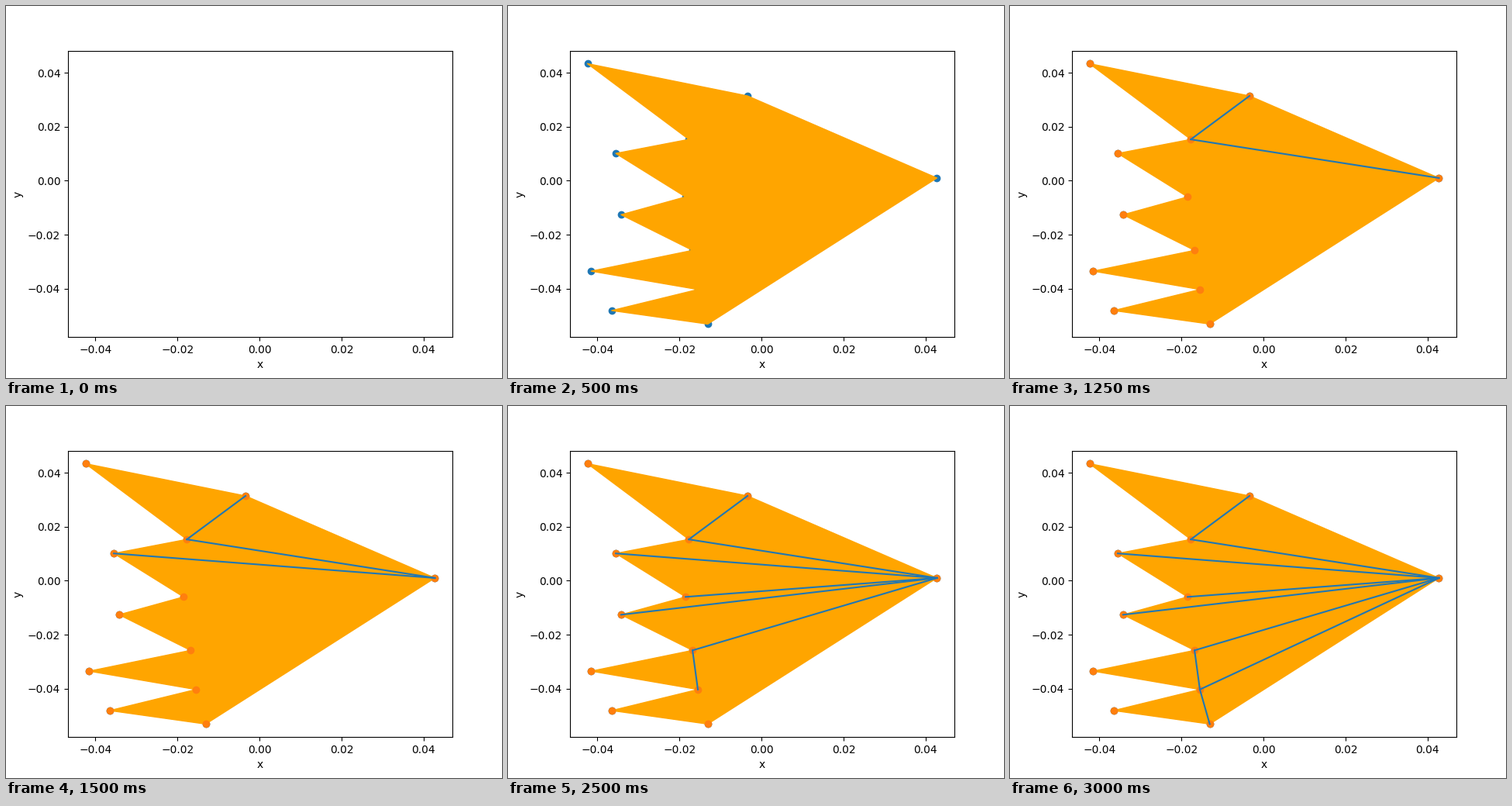
These frames come from a looping animation (640x480 px, 3.25 s). A matplotlib script:

```python
import matplotlib.pyplot as plt
from matplotlib.animation import FuncAnimation

INTERVAL = 250

# the two chains of a y-monotone polygon, each from top to bottom
LEFT = [(-0.0424, 0.04335), (-0.0177, 0.0153), (-0.0355, 0.0101),
        (-0.0185, -0.0060), (-0.0342, -0.0126), (-0.0168, -0.0258),
        (-0.0415, -0.0335), (-0.0155, -0.0403), (-0.0365, -0.0481),
        (-0.0131, -0.0531)]
RIGHT = [(-0.0034, 0.0314), (0.04275, 0.0010)]


def cross(o, a, b):
    return (a[0] - o[0]) * (b[1] - o[1]) - (a[1] - o[1]) * (b[0] - o[0])


def triangulate(left, right):
    """Sweep down a monotone polygon and list its diagonals as found."""
    order = sorted(left + right, key=lambda p: -p[1])
    stack, diagonals = order[:2], []
    for p in order[2:-1]:
        on_right = p in right
        if on_right != (stack[-1] in right):
            diagonals += [(p, q) for q in stack[1:]]
            stack = [stack[-1], p]
            continue
        sign = 1 if on_right else -1
        last = stack.pop()
        while stack and sign * cross(p, last, stack[-1]) > 0:
            last = stack.pop()
            diagonals.append((p, last))
        stack += [last, p]
    return diagonals + [(order[-1], q) for q in stack[1:-1]]


fig, ax = plt.subplots(figsize=(6.4, 4.8), dpi=100)
ax.set_xlabel("x")
ax.set_ylabel("y")

xs, ys = zip(*LEFT, *reversed(RIGHT))
steps = [
    ax.scatter(xs, ys, color="tab:blue"),
    ax.fill(xs, ys, color="orange", joinstyle="round")[0],
    ax.scatter(xs, ys, color="tab:orange"),
]
for edge in triangulate(LEFT, RIGHT):
    steps += ax.plot(*zip(*edge), color="tab:blue")


def update(frame):
    for i, artist in enumerate(steps):
        artist.set_visible(i < frame)
    return steps


anim = FuncAnimation(fig, update, frames=len(steps) + 1,
                     interval=INTERVAL, repeat=True, repeat_delay=0)
plt.show()
```
